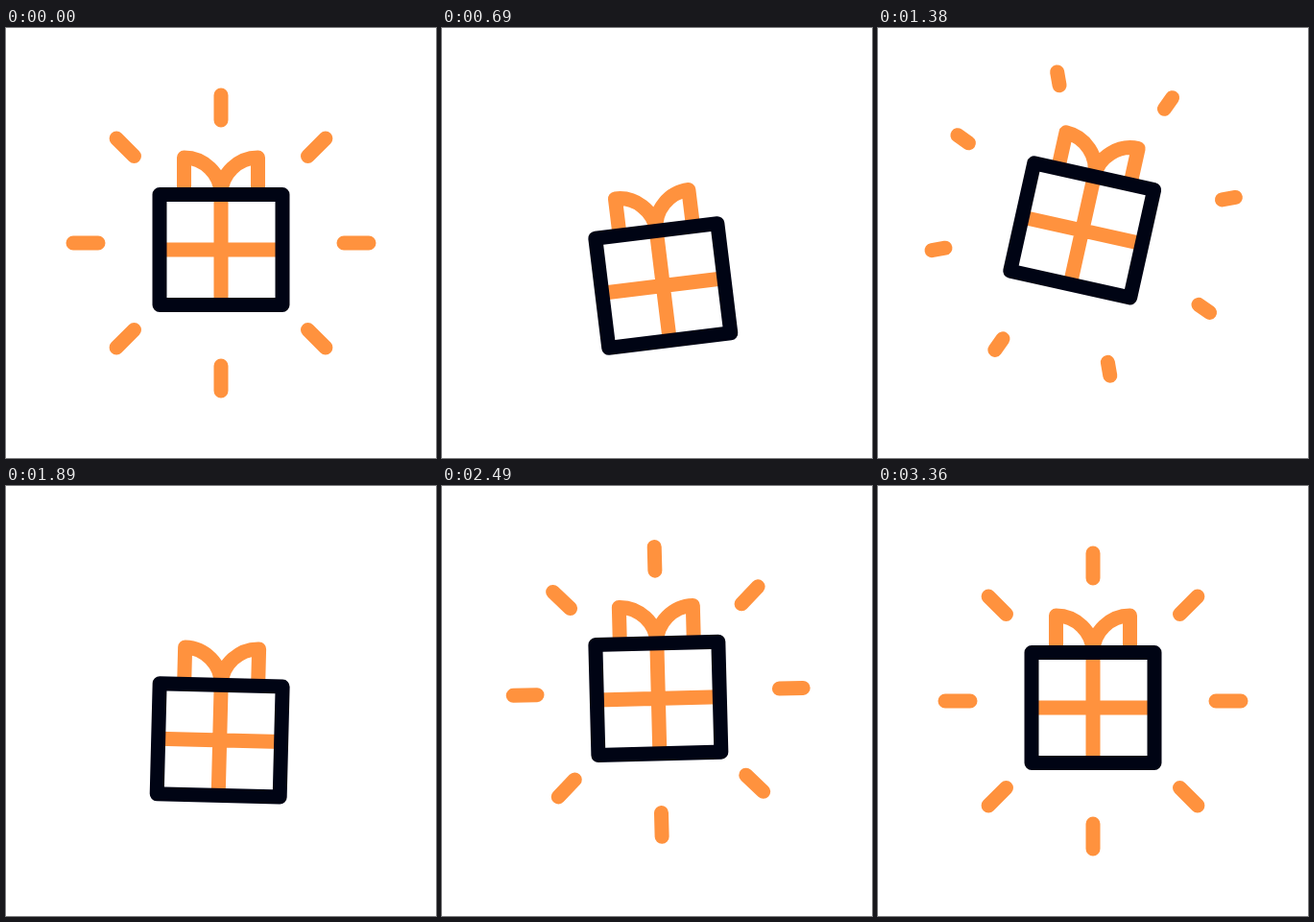
An HTML page with a canvas that plays this animation: 448 by 448 pixels, repeating every 3.6 s.

```html
<!DOCTYPE html>
<html lang="en">
<head>
<meta charset="utf-8">
<title>Gift</title>
<style>
  html, body { margin: 0; width: 100%; height: 100%; overflow: hidden; background: #fff; }
  canvas { display: block; width: 448px; height: 448px; }
</style>
</head>
<body>
<canvas id="stage" width="448" height="448"></canvas>
<script>
const ctx = document.getElementById('stage').getContext('2d');
const ORANGE = '#ff923e';
const NAVY = '#000414';
const LOOP = 3600;
const STEP = 30;
const CENTER = 224;
const PIVOT_Y = 179;

// Ray radii: where they emerge, where they rest, where they vanish.
const BIRTH = 90;
const REST_INNER = 128;
const REST_OUTER = 154;
const VANISH = 173;

const mix = (a, b, u) => a + (b - a) * u;
const progress = (t, from, to) => Math.min(1, Math.max(0, (t - from) / (to - from)));
const easeInOut = u => (1 - Math.cos(Math.PI * u)) / 2;
const easeOut = (u, power) => 1 - (1 - u) ** power;
const radians = degrees => degrees * Math.PI / 180;

// Starts at zero and eases through each turning point in order.
function swing(t, from, ...turns) {
  let value = 0;
  for (const [time, next] of turns) {
    value = mix(value, next, easeInOut(progress(t, from, time)));
    from = time;
  }
  return value;
}

const liftAt = t =>
  swing(t, 200, [635, 39], [1285, -24], [1790, 36.5], [2450, -10], [2900, 9.5], [3270, 0]);
const tiltAt = t =>
  swing(t, 150, [590, -7.5], [1620, 15.5], [2100, -8], [2820, 3.5], [3270, 0]);

function raysAt(t) {
  if (t < 330) {
    const u = t / 330;
    return {
      inner: mix(REST_INNER, VANISH, u),
      outer: mix(REST_OUTER, VANISH, u),
      spin: -45 * u * u
    };
  }
  if (t < 1540) {
    const u = progress(t, 920, 1540);
    return {
      inner: Math.max(BIRTH, mix(70, VANISH, u)),
      outer: mix(BIRTH, VANISH, easeOut(u, 1.4)),
      spin: -45 * progress(t, 1130, 1484) ** 2
    };
  }
  const u = easeOut(progress(t, 2090, 2600), 2);
  return {
    inner: mix(BIRTH, REST_INNER, u),
    outer: mix(BIRTH, REST_OUTER, u),
    spin: 0
  };
}

function drawRays(t) {
  const { inner, outer, spin } = raysAt(t);
  if (outer - inner < 0.3) return;
  ctx.beginPath();
  for (let k = 0; k < 8; k++) {
    const angle = radians(k * 45 + spin);
    const c = Math.cos(angle), s = Math.sin(angle);
    ctx.moveTo(CENTER + inner * c, CENTER + inner * s);
    ctx.lineTo(CENTER + outer * c, CENTER + outer * s);
  }
  ctx.lineCap = 'round';
  ctx.stroke();
}

function drawGift() {
  ctx.lineCap = 'butt';
  ctx.beginPath();
  for (const side of [-1, 1]) {
    const x = d => CENTER + side * d;
    ctx.moveTo(x(38.5), 173);
    ctx.lineTo(x(38.5), 135);
    ctx.bezierCurveTo(x(18), 135, CENTER, 152, CENTER, 173);
  }
  ctx.moveTo(CENTER, 173);
  ctx.lineTo(CENTER, 288);
  ctx.moveTo(160, 231);
  ctx.lineTo(288, 231);
  ctx.stroke();

  ctx.strokeStyle = NAVY;
  ctx.strokeRect(160, 173.5, 128, 115);
}

function draw(t) {
  ctx.fillStyle = '#fff';
  ctx.fillRect(0, 0, 448, 448);
  ctx.save();
  ctx.translate(CENTER, PIVOT_Y + liftAt(t));
  ctx.rotate(radians(tiltAt(t)));
  ctx.translate(-CENTER, -PIVOT_Y);
  ctx.lineWidth = 15;
  ctx.lineJoin = 'round';
  ctx.strokeStyle = ORANGE;
  drawRays(t);
  drawGift();
  ctx.restore();
}

const start = performance.now();
function tick() {
  const t = (performance.now() - start) % LOOP;
  draw(Math.floor(t / STEP) * STEP);
  requestAnimationFrame(tick);
}
tick();
</script>
</body>
</html>
```
